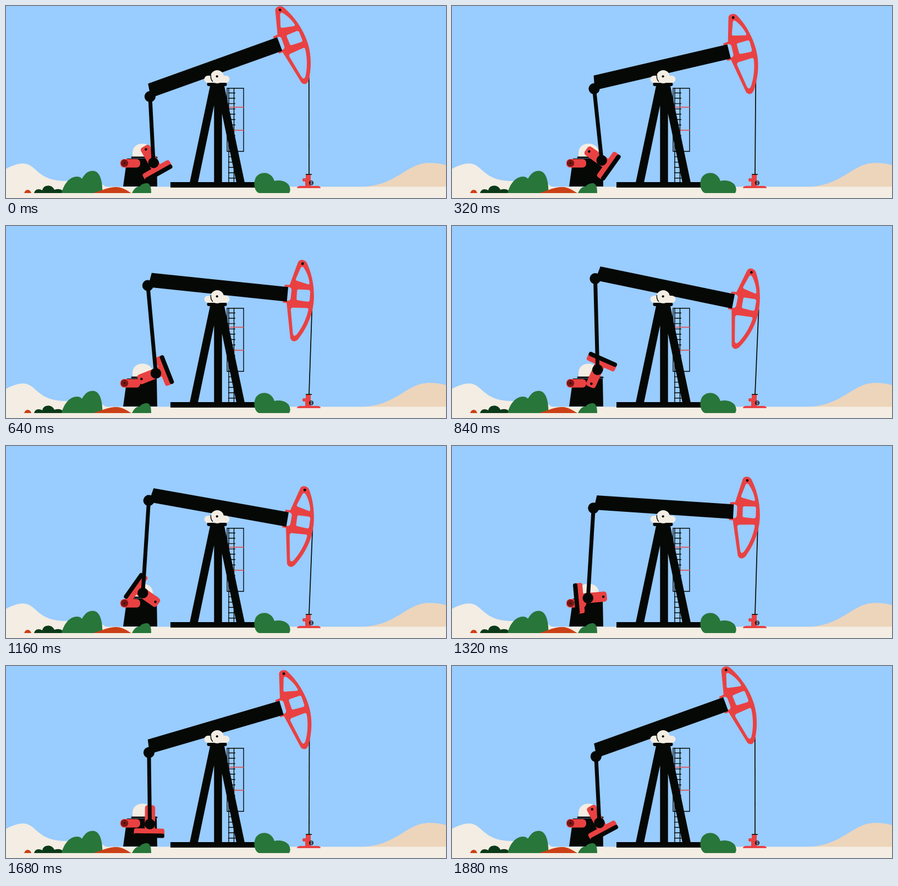
These frames come from a looping animation (800 by 350 pixels, 1920 ms). An HTML page:

```html
<!DOCTYPE html>
<html lang="en">
<head>
<meta charset="utf-8">
<title>Pumpjack</title>
<style>
  html, body { margin: 0; width: 100%; height: 100%; overflow: hidden; background: #9cf; }
  svg { display: block; width: 800px; height: 350px; }
  .ink { fill: #050805; }
  .red { fill: #e94142; }
  .cream { fill: #f3ede3; }
  .leaf { fill: #28763a; }
  .pine { fill: #0c3a18; }
  .rust { fill: #cb4016; }
  .line { fill: none; stroke: #050805; }
</style>
</head>
<body>
<svg viewBox="0 0 800 350">
  <!-- land -->
  <path class="cream" d="M0 297C12 290 24 287 31 287C57 288 55 319 110 319H150Q172 321 182 330V350H0Z"/>
  <path fill="#ecd5bb" d="M640 330C710 330 727 286 769 286Q786 286 800 290V331H640Z"/>
  <rect class="cream" y="329.500" width="800" height="20.500"/>

  <!-- engine house -->
  <path class="ink" d="M220 278H274L275 329H213Z"/>
  <path class="cream" d="M230 275V268C230 257 238 251 248 251S267 257 267 268V275Z"/>
  <rect class="ink" x="227.500" y="274.500" width="48" height="3" rx="1.500"/>
  <rect class="red" x="208" y="279" width="36" height="15.500" rx="6.500"/>
  <circle cx="215.500" cy="286.500" r="6.800" fill="#7d1714"/>
  <path class="line" stroke-width=".6" d="M213 286.500H218M215.500 284V289"/>

  <!-- ladder and cage -->
  <g class="line" stroke-width="1.400">
    <path d="M402 150H432V265H402ZM405 149V321M414.500 149V321"/>
    <path id="rungs"/>
    <path stroke="#e94142" d="M403 184.500H433M412 226.500H433"/>
  </g>

  <!-- tower -->
  <path class="ink" d="M371 146H397L434 322H419L392.700 196V322H378.300V181L349 322H334Z"/>
  <rect class="ink" x="365.500" y="139.500" width="36" height="6.500" rx="3"/>
  <rect class="ink" x="299" y="321" width="156" height="10"/>

  <!-- wellhead -->
  <path id="rope" class="line" stroke-width="1.700"/>
  <path class="red" d="M545 307H554V328H568Q572 329 572 332H529Q529 329 534 328H544V320H541Q539 320 539 317T541 314H545Z"/>
  <path class="line" stroke-width="1.500" d="M545 307H556M551.500 322.500H558.500"/>
  <circle class="line" stroke-width="1.200" cx="555" cy="322.500" r="3.300"/>

  <g id="crank">
    <rect class="red" x="-21" y="-10.500" width="48" height="18.500" rx="5"/>
    <rect class="red" x="21.500" y="-28" width="14" height="55.500" rx="4"/>
    <rect class="ink" x="30.500" y="-28" width="8" height="55.500" rx="3.500"/>
    <circle class="ink" cx="-14.600" cy="-1.300" r="2.300"/>
    <circle class="ink" cx="13.400" cy="-1.300" r="9.700"/>
  </g>
  <path id="rod" class="line" stroke-width="7"/>

  <g id="beam">
    <path class="red" fill-rule="evenodd" d="M518.500 43C519.500 35.500 530 35.500 534 40C547 58 559 88 559 118C559 140 552.500 162 542 181Q535 190.500 528 182L510.500 119L503.500 119.500L501.500 87L510.500 85.500Z
      M525 52Q527 47 531 51Q541 62 545.500 76Q546 79.500 543 79L522 76Q519 75 520 72Z
      M528 91L546 89Q549 89 549.500 92L551 107Q551 110 548 110.500L530 111Q527 111 527 108L525.500 94Q525.500 91 528 91Z
      M523 125.500L548 122Q551.500 121.500 551.500 125C551 141 545 161 538 173Q533.500 179 531 172L520 130Q520 126 523 125.500Z"/>
    <rect x="500" y="90" width="16" height="25" rx="5" fill="#9cf" transform="rotate(-3.700 509 103)"/>
    <path class="ink" d="M259.500 106L508.500 90L510.500 116.500L257 132.500Z"/>
    <circle class="ink" cx="256.400" cy="129.800" r="10"/>
    <circle class="ink" cx="527.200" cy="43.500" r="2.400"/>
  </g>

  <!-- bearing -->
  <rect class="cream" x="360.500" y="127" width="46" height="13" rx="6.500"/>
  <circle class="cream" cx="384" cy="129" r="12"/>
  <path class="line" stroke-width="1.400" d="M376 138Q371.500 133 372.500 126"/>
  <circle class="ink" cx="383.700" cy="128.300" r="2.100"/>

  <!-- plants -->
  <path class="rust" d="M33 341Q35 335 39.500 335T46 341Z"/>
  <path class="pine" d="M51 341Q53 334 59 334Q63 334 66 336C68 325 84 325 88 335Q97 332 102 336Q115 334 117 341Z"/>
  <path class="leaf" d="M101 341C106 322 117 311 129 311Q135 311 138 315C144 304 151 300 159 300.500C171 302 175.500 318 175.500 341Z"/>
  <path class="rust" d="M159 341C177 335 187 330 200 330S220 337 228 341Z"/>
  <path class="leaf" d="M229 341Q235 328 243 329Q246 324 255 323Q264 322 264 341Z"/>
  <path class="leaf" d="M460 341C450 337 450 321 454 313C461 301 482 300 488 319C496 317 508 318 514 326Q519 334 515 341Z"/>
</svg>
<script>
const LOOP = 1920, SWING = 32.2;
const PIVOT = [384, 128], HUB = [260.5, 274.7];
const el = id => document.getElementById(id);

// Cubic easing with handles (x1, 0) and (x2, 1)
function ease(x, x1, x2) {
  let lo = 0, hi = 1, s;
  for (let i = 0; i < 24; i++) {
    s = (lo + hi) / 2;
    const at = 3 * s * (1 - s) ** 2 * x1 + 3 * s * s * (1 - s) * x2 + s ** 3;
    if (at < x) lo = s; else hi = s;
  }
  return s * s * (3 - 2 * s);
}

function turned([cx, cy], x, y, deg) {
  const a = deg * Math.PI / 180, c = Math.cos(a), s = Math.sin(a);
  return [cx + x * c - y * s, cy + x * s + y * c];
}

function draw() {
  const t = performance.now() % LOOP / LOOP;
  const e = ease(t * 2 % 1, .5, .5);
  const dip = t < .5 ? e : 1 - e;
  const tilt = SWING * (dip - .5);
  const spin = 60.5 - 360 * ease(t, .32, .82);

  el('beam').setAttribute('transform', `rotate(${tilt} ${PIVOT})`);
  el('crank').setAttribute('transform', `translate(${HUB}) rotate(${spin})`);
  el('rod').setAttribute('d',
    `M${turned(PIVOT, -127.6, 1.8, tilt)}L${turned(HUB, 13.4, -1.3, spin)}`);
  el('rope').setAttribute('d', `M${550.8 + 7 * dip} ${130 + 22 * dip}L551 307`);
  requestAnimationFrame(draw);
}

let rungs = '';
for (let y = 158.5; y < 321; y += 9.7) rungs += `M404 ${y}H417`;
el('rungs').setAttribute('d', rungs);
draw();
</script>
</body>
</html>
```
